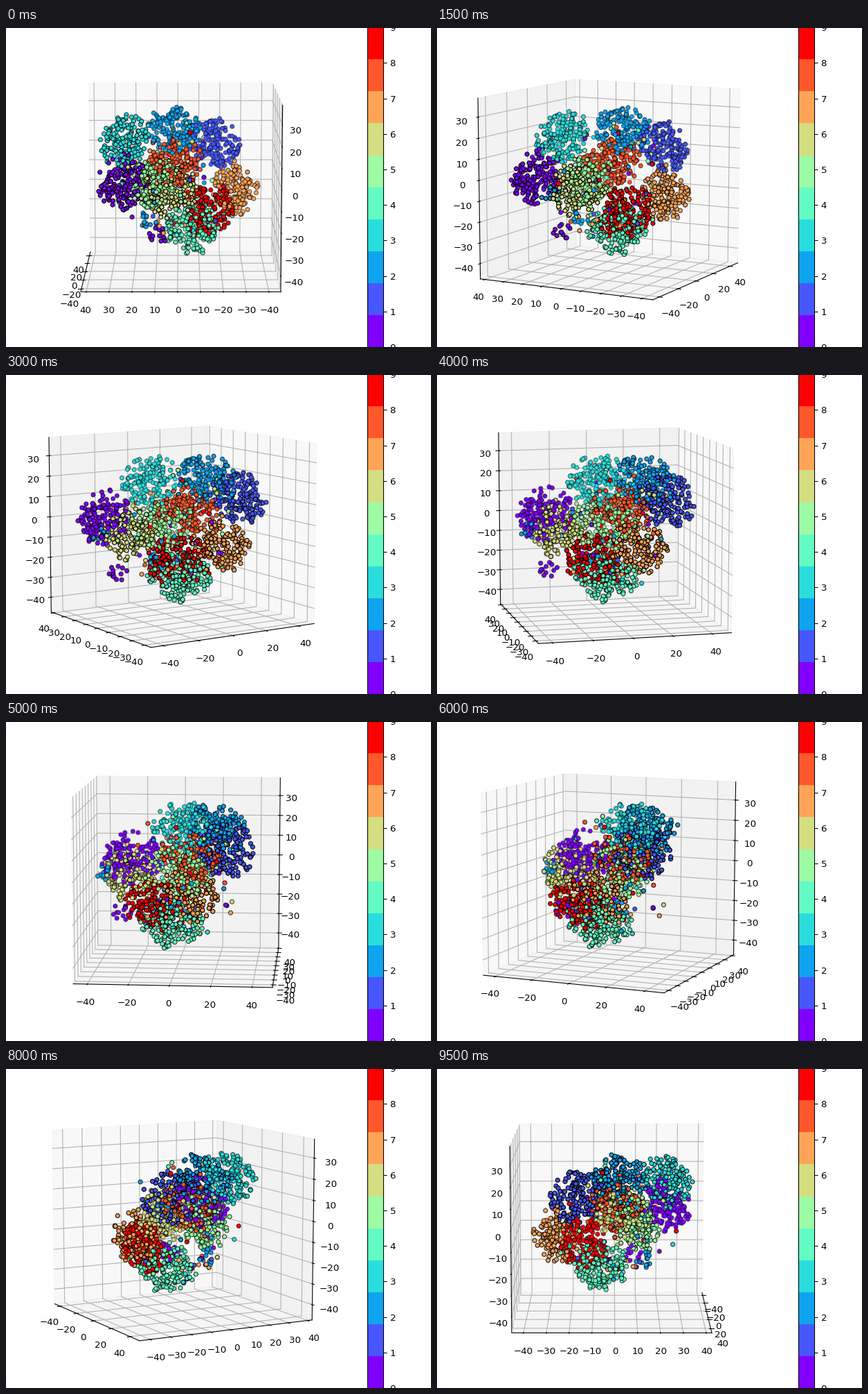
Animation, 614 px wide and 460 px high, one loop 10 s. Source, as a matplotlib script:

```python
import numpy as np
import matplotlib
import matplotlib.pyplot as plt
from matplotlib.animation import FuncAnimation
from matplotlib.cm import ScalarMappable
from matplotlib.colors import Normalize

WIDTH, HEIGHT, DPI = 614, 460, 96
# The layout is 6.4 x 4.8 inches; the stage trims its fractional pixels.
LAYOUT_X, LAYOUT_Y = 6.4 * DPI / WIDTH, 4.8 * DPI / HEIGHT
FRAMES, INTERVAL = 20, 500
ELEV = np.radians(10)
DISTANCE = 10
AZIMUTHS = np.radians(np.linspace(180, 360, FRAMES))

# Data range and tick step of each axis; the box itself is a unit cube.
LIMITS = np.array([(-44.9, 47.9), (-43.4, 40.7), (-45.7, 37.2)])
STEPS = (20, 10, 10)
EDGE = 0.5 + 1 / 48
LABEL_EDGE = EDGE + 0.0644
TICK = 1 / 120
PANE_GREYS = (0.95, 0.90, 0.925)

# Cluster centres of the digits 0 to 9 around the middle of the box.
CENTRES = np.array([
    (-0.30, 0.30, 0.06), (0.25, -0.18, 0.20), (0.20, 0.04, 0.28),
    (0.00, 0.30, 0.25), (-0.05, -0.06, -0.25), (0.00, 0.15, 0.01),
    (-0.28, 0.06, 0.01), (0.06, -0.30, -0.05), (0.05, 0.03, 0.11),
    (-0.12, -0.15, -0.14)])
# Small groups that broke away from a cluster: digit and centre.
SPLINTERS = [(0, (-0.33, 0.12, -0.24)), (2, (-0.04, 0.19, -0.21)),
             (2, (-0.43, 0.13, 0.00)), (4, (-0.09, -0.07, -0.38))]
CLUSTER_SIZE, STRAY_SIZE, SPLINTER_SIZE = 165, 10, 12
CLUSTER_RADII = (0.19, 0.16, 0.17)

rng = np.random.default_rng(7)


def ball(count):
    """Uniform random points in the unit ball."""
    direction = rng.normal(size=(count, 3))
    direction /= np.linalg.norm(direction, axis=1, keepdims=True)
    return direction * rng.random((count, 1)) ** (1 / 3)


def cluster(centre):
    """A ball of points, flattened along the line to the middle."""
    offset = ball(CLUSTER_SIZE) * CLUSTER_RADII
    normal = centre / np.linalg.norm(centre)
    return centre + offset - 0.2 * np.outer(offset @ normal, normal)


def make_cloud():
    groups = []
    for digit, centre in enumerate(CENTRES):
        groups.append((digit, cluster(centre)))
        groups.append((digit, 0.36 * ball(STRAY_SIZE)))
    for digit, centre in SPLINTERS:
        groups.append((digit, centre + 0.06 * ball(SPLINTER_SIZE)))
    points = np.concatenate([group for _, group in groups])
    digits = np.repeat([digit for digit, _ in groups],
                       [len(group) for _, group in groups])
    order = rng.permutation(len(digits))
    return points[order], digits[order]


def project(points, azimuth):
    """Screen x, screen y and depth of points around the box centre."""
    x, y, z = np.moveaxis(np.asarray(points, float), -1, 0)
    cos, sin = np.cos(azimuth), np.sin(azimuth)
    toward = cos * x + sin * y
    depth = DISTANCE - toward * np.cos(ELEV) - z * np.sin(ELEV)
    up = z * np.cos(ELEV) - toward * np.sin(ELEV)
    return (cos * y - sin * x) / depth, up / depth, depth


def draw_line(points, azimuth, **style):
    x, y, _ = project(points, azimuth)
    ax.plot(x, y, **style)


def replaced(point, axis, value):
    point = list(point)
    point[axis] = value
    return point


def ticks_of(axis):
    low, high = LIMITS[axis]
    for value in range(-40, 41, STEPS[axis]):
        if low <= value <= high:
            yield value, (value - low) / (high - low) - 0.5


def draw_pane(axis, walls, azimuth):
    a, b = [i for i in range(3) if i != axis]
    corners = [replaced(replaced(walls, a, i * EDGE), b, j * EDGE)
               for i, j in ((-1, -1), (-1, 1), (1, 1), (1, -1))]
    x, y, _ = project(corners, azimuth)
    ax.fill(x, y, color=(PANE_GREYS[axis],) * 3, alpha=0.5, lw=1, zorder=1)


def draw_axis(axis, walls, azimuth):
    others = [i for i in range(3) if i != axis]
    tick_axis = 1 if axis == 0 else 0

    # The spine runs along the far side of the box from one wall.
    spine = replaced(walls, tick_axis, -walls[tick_axis])
    draw_line([replaced(spine, axis, end) for end in (-EDGE, EDGE)],
              azimuth, color="k", lw=0.8, zorder=3)

    outward = np.sign(spine[tick_axis]) * TICK
    for value, place in ticks_of(axis):
        corner = replaced(walls, axis, place)
        first, last = [replaced(corner, i, -corner[i]) for i in others]
        draw_line([first, corner, last], azimuth,
                  color="#b0b0b0", lw=0.8, zorder=2)

        base = replaced(spine, axis, place)
        draw_line([replaced(base, tick_axis, base[tick_axis] + shift)
                   for shift in (-outward, 2 * outward)],
                  azimuth, color="k", lw=0.8, zorder=3)

        label = replaced(np.sign(spine) * LABEL_EDGE, axis, place)
        x, y, _ = project(label, azimuth)
        ax.text(x, y, str(value).replace("-", "\u2212"),
                ha="center", va="top", zorder=4)


def draw_cloud(azimuth):
    x, y, depth = project(cloud, azimuth)
    outlines = np.zeros((len(cloud), 4))
    outlines[:, 3] = 1 - 0.7 * (depth - depth.min()) / np.ptp(depth)
    ax.scatter(x, y, c=labels, cmap=cmap, norm=norm, s=20,
               edgecolors=outlines, linewidths=1, zorder=5)


def draw(frame):
    azimuth = AZIMUTHS[frame]
    ax.clear()
    ax.axis("off")
    ax.set(xlim=(-0.095, 0.09), ylim=(-0.095, 0.09))

    walls = [-EDGE if np.cos(azimuth) > 0 else EDGE,
             EDGE if np.sin(azimuth) < -1e-6 else -EDGE,
             -EDGE]
    for axis in range(3):
        draw_pane(axis, walls, azimuth)
        draw_axis(axis, walls, azimuth)
    draw_cloud(azimuth)


plt.rcParams.update({"font.family": "DejaVu Sans", "font.size": 10})
cloud, labels = make_cloud()
cmap = matplotlib.colormaps["rainbow"].resampled(10)
norm = Normalize(0, 9)

fig = plt.figure(figsize=(WIDTH / DPI, HEIGHT / DPI), dpi=DPI,
                 facecolor="white")
ax = fig.add_axes([0, 0, 0.8 * LAYOUT_X, LAYOUT_Y])
bar_ax = fig.add_axes([0.85 * LAYOUT_X, 0, 0.0375 * LAYOUT_X, LAYOUT_Y])
fig.colorbar(ScalarMappable(norm, cmap), cax=bar_ax, ticks=range(10))

anim = FuncAnimation(fig, draw, frames=FRAMES, interval=INTERVAL,
                     init_func=lambda: None, repeat=True, repeat_delay=0)
plt.show()
```
